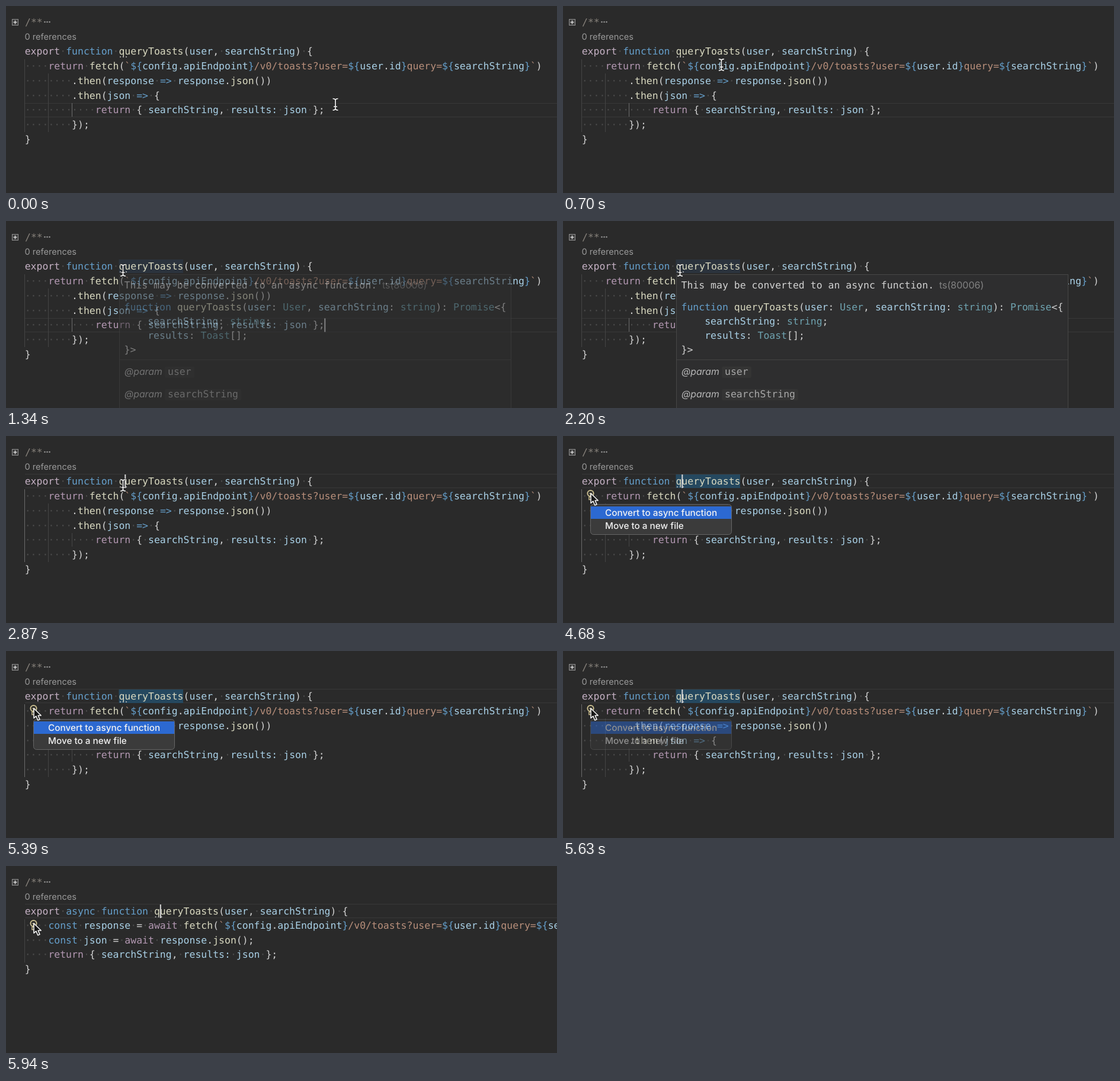
Animation, 930 px wide and 316 px high, one loop 6.02 s. Source, as an HTML page:

```html
<!DOCTYPE html>
<html lang="en">
<head>
<meta charset="utf-8">
<title>Convert to async function</title>
<style>
  html, body { margin: 0; width: 100%; height: 100%; overflow: hidden; background: #2a2a2a; }
  svg { display: block; }
  text { font: 16.48px "DejaVu Sans Mono", monospace; text-rendering: geometricPrecision; white-space: pre; }
  .sans { font-family: Inter, sans-serif; }
  .k { fill: #b398b2; } .e { fill: #c5b1c4; } .b { fill: #659fcb; } .f { fill: #d9d9c0; }
  .v { fill: #a9d0e6; } .s { fill: #b88f7b; } .p { fill: #d2d2d2; } .t { fill: #6fa3b0; }
  .d { fill: #4c4c4c; } .g { fill: #87827b; }
  .guide { stroke: #454545; } .guide.on { stroke: #6c6c6c; }
  .doc { font-size: 15.8px; font-style: italic; }
  .item { font-size: 15.3px; font-weight: 500; }
  #bulb { stroke: #dcb640; } #bulb.hover { stroke: #c9bd8e; }
</style>
</head>
<body>
<svg id="stage" width="930" height="316" viewBox="0 0 930 316">
  <defs>
    <path id="beamShape" d="M-4.5 -9.5Q-1 -9.5 0 -7.5Q1 -9.5 4.5 -9.5M0 -8V8.5M-4.5 10Q-1 10 0 8Q1 10 4.5 10M-3 4H3"/>
  </defs>
  <rect width="930" height="316" fill="#2a2a2a"/>
  <g id="lineBox" fill="none" stroke="#383838"><path d="M32 .5H930M32 23.5H930"/></g>
  <rect id="wordBox" x="190.5" y="65" width="108.5" height="23"/>

  <rect x="10.5" y="22.5" width="10" height="10" fill="#3c3c3c" stroke="#929292"/>
  <path d="M12.5 27.5h6M15.5 24.5v6" stroke="#d8d8d8" stroke-width="1.5"/>
  <text class="g" x="32" y="32.5">/**</text>
  <g fill="#929292"><circle cx="65.5" cy="27" r="1.3"/><circle cx="69.5" cy="27" r="1.3"/><circle cx="73.5" cy="27" r="1.3"/></g>
  <text class="sans" x="31.5" y="57" style="font-size:14.6px" fill="#999">0 references</text>

  <g id="before"></g>
  <g id="after"></g>
  <g id="hint" fill="#b9b9b9"><circle cx="193" cy="86" r="1.1"/><circle cx="198" cy="86" r="1.1"/><circle cx="203" cy="86" r="1.1"/></g>
  <rect id="caret" width="2" height="23" fill="#d8d8d8"/>

  <g id="bulb" fill="#2a2a2a">
    <rect x="38" y="91" width="17" height="20" stroke="none"/>
    <circle cx="46.5" cy="97" r="5.1" stroke-width="2"/>
    <path d="M44.5 97h4M46.5 97v5M44 103h5v4.5h-5z" stroke-width="1.5"/>
  </g>

  <g id="tip">
    <rect x="191.5" y="90.5" width="661" height="240" fill="#2e2e2f" stroke="#474747"/>
    <path d="M192 234.5H852" stroke="#434343"/>
    <text class="sans" x="635" y="114" style="font-size:16px" fill="#828282">ts(80006)</text>
    <text class="sans doc" x="200" y="260" fill="#b8b8b8">@param</text>
    <text class="sans doc" x="200" y="298" fill="#b8b8b8">@param</text>
    <rect x="268" y="246" width="50" height="19" rx="3" fill="#343434"/>
    <rect x="268" y="284" width="129" height="19" rx="3" fill="#343434"/>
    <text x="273" y="260" fill="#a8a8a8">user</text>
    <text x="273" y="298" fill="#a8a8a8">searchString</text>
  </g>

  <g id="menu" fill="#f2f2f2">
    <rect x="46.5" y="115.5" width="238" height="51" rx="5" fill="#3b3b3b" stroke="#666"/>
    <rect x="47" y="119" width="237" height="21" fill="#2c69d1"/>
    <text class="sans item" x="71" y="135">Convert to async function</text>
    <text class="sans item" x="71" y="157">Move to a new file</text>
  </g>

  <g id="beam" fill="none">
    <use href="#beamShape" stroke="#1c1c1c" stroke-width="3.2"/>
    <use href="#beamShape" stroke="#f0f0f0" stroke-width="1.7"/>
  </g>
  <path id="arrow" d="M0 0V16.5L3.8 13L6.8 20L10 18.6L7.1 12H12.2Z" fill="#161616" stroke="#f2f2f2" stroke-width="1.6" stroke-linejoin="round"/>
</svg>

<script>
const LOOP = 6020, CHAR = 9.921, LEFT = 31.7, TOP = 81.5;
const el = id => document.getElementById(id);

function add(parent, tag, attrs, content = '') {
  const node = document.createElementNS('http://www.w3.org/2000/svg', tag);
  for (const name in attrs) node.setAttribute(name, attrs[name]);
  node.textContent = content;
  parent.appendChild(node);
}

// Each "~" starts a token; the letter after it is its colour class.
function writeLine(parent, source, x, y, dots = true) {
  let col = 0;
  for (const token of source.split('~').slice(1)) {
    for (const run of token.slice(1).match(/ +|[^ ]+/g)) {
      const space = run[0] === ' ';
      if (!space) add(parent, 'text', { class: token[0], x: x + col * CHAR, y }, run);
      else if (dots) [...run].forEach((_, i) =>
        add(parent, 'text', { class: 'd', x: x + (col + i) * CHAR, y }, '·'));
      col += run.length;
    }
  }
}

function guide(parent, x, top, bottom, id) {
  add(parent, 'path', { class: 'guide', d: `M${x} ${top}V${bottom}`, ...(id && { id }) });
}

const url = '~s`~b${~vconfig~p.~vapiEndpoint~b}~s/v0/toasts?user=~b${~vuser~p.~vid~b}~squery=~b${~vsearchString~b}~s`~p)';
const args = '~fqueryToasts~p(~vuser~p, ~vsearchString~p) {';
const result = '~kreturn~p { ~vsearchString~p, ~vresults:~p ~vjson~p };';

guide(el('before'), 31.5, 90, 213, 'outerGuide');
guide(el('before'), 71.5, 114, 213);
guide(el('before'), 111.5, 164, 187, 'innerGuide');
[
  '~eexport~p ~bfunction~p ' + args,
  '~p    ~kreturn~p ~ffetch~p(' + url,
  '~p        .~fthen~p(~vresponse~p ~b=>~p ~vresponse~p.~fjson~p())',
  '~p        .~fthen~p(~vjson~p ~b=>~p {',
  '~p            ' + result,
  '~p        });',
  '~p}'
].forEach((line, i) => writeLine(el('before'), line, LEFT, TOP + i * 24.7 + (i && 0.9)));

guide(el('after'), 31.5, 90, 163);
[
  '~eexport~p ~basync~p ~bfunction~p ' + args,
  '~p    ~bconst~p ~vresponse~p = ~kawait~p ~ffetch~p(' + url + '~p;',
  '~p    ~bconst~p ~vjson~p = ~kawait~p ~vresponse~p.~fjson~p();',
  '~p    ' + result,
  '~p}'
].forEach((line, i) => writeLine(el('after'), line, LEFT, TOP + i * 24.6));

[
  ['~pThis may be converted to an async function.', 114],
  ['~bfunction~p ~fqueryToasts~p(~vuser~p: ~tUser~p, ~vsearchString~p: ~tstring~p): ~tPromise~p<{', 151],
  ['~p    ~vsearchString~p: ~tstring~p;', 175],
  ['~p    ~vresults~p: ~tToast~p[];', 199],
  ['~p}>', 222.5]
].forEach(([line, y]) => writeLine(el('tip'), line, 199.5, y, false));

// Steps are [time, ...values].
const MOUSE = [
  [70, 556, 166], [950, 197.5, 83], [3540, 197.5, 83],
  [3740, 93, 100], [3960, 47, 97]
];
const TIP = [[1240, 0], [1440, 1], [2530, 1], [2690, 0]];
const MENU = [[4289, 0], [4290, 1], [5470, 1], [5790, 0]];
const CLICK = 2530, MARK = 3190, BULB = 3580, ON_BULB = 3900, CONVERT = 5780;

const smooth = u => u * u * (3 - 2 * u);

function sample(steps, t, ease = u => u) {
  const next = steps.findIndex(step => step[0] > t);
  if (next === 0) return steps[0].slice(1);
  if (next < 0) return steps[steps.length - 1].slice(1);
  const a = steps[next - 1], b = steps[next];
  const u = ease((t - a[0]) / (b[0] - a[0]));
  return a.slice(1).map((value, i) => value + (b[i + 1] - value) * u);
}

const show = (id, on) => { el(id).style.display = on ? '' : 'none'; };
const move = (id, x, y) => el(id).setAttribute('transform', `translate(${x} ${y})`);

function render(t) {
  const clicked = t >= CLICK, converted = t >= CONVERT, onBulb = t >= ON_BULB;
  const shift = converted ? 6 * CHAR : 0;

  show('before', !converted);
  show('after', converted);
  move('hint', shift, 0);
  move('lineBox', 0, clicked ? 64 : 164);
  el('outerGuide').classList.toggle('on', clicked);
  el('innerGuide').classList.toggle('on', !clicked);

  const marked = t >= MARK && !converted;
  show('wordBox', marked || (t >= 1240 && !clicked));
  el('wordBox').setAttribute('fill', marked ? '#25485f' : '#2b333d');

  const blinkStart = clicked ? CLICK : 180;
  show('caret', t >= blinkStart && (t - blinkStart) % 1000 < 500);
  if (clicked) move('caret', 200.3 + shift, 65);
  else move('caret', 537.3, 164.5);

  el('tip').style.opacity = sample(TIP, t)[0];
  el('menu').style.opacity = sample(MENU, t)[0];
  show('bulb', t >= BULB);
  el('bulb').classList.toggle('hover', onBulb);

  const [x, y] = sample(MOUSE, t, smooth);
  show('beam', !onBulb);
  show('arrow', onBulb);
  move('beam', x, y);
  move('arrow', x, y);
}

const start = performance.now();
function tick() {
  render((performance.now() - start) % LOOP);
  requestAnimationFrame(tick);
}
tick();
</script>
</body>
</html>
```
